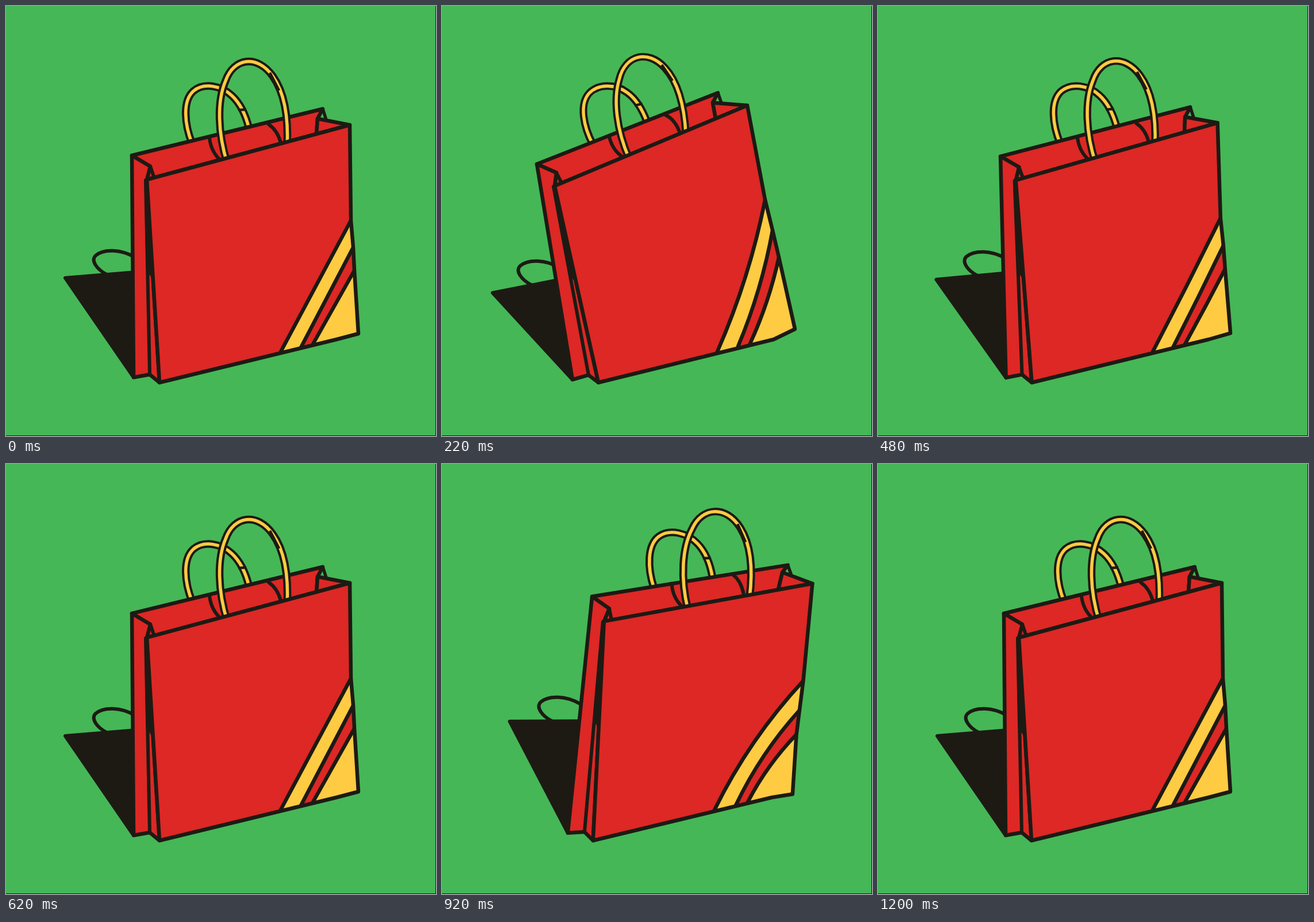
These frames come from a looping animation (748 by 748 pixels, 1.22 s). An HTML page with a canvas:

```html
<!DOCTYPE html>
<html lang="en">
<head>
<meta charset="utf-8">
<title>Swinging bag</title>
<style>
html, body { margin: 0; height: 100%; overflow: hidden; background: #45b757; }
canvas { display: block; width: 100vw; height: 100vh; }
</style>
</head>
<body>
<canvas id="stage" width="748" height="748"></canvas>
<script>
const ctx = document.getElementById('stage').getContext('2d');
const GREEN = '#45b757', RED = '#dd2825', YELLOW = '#fecb43', INK = '#1d1a14';
const LOOP = 1220, STEP = 20, HALF = 600, PEAK = 230;

// x, y at rest, then the shift for a full left lean and for a full right lean
const POINTS = {
  backL: [219, 260, -54, 15, 40, -28],
  backR: [551, 179, -71, -28, 48, -3],
  frontL: [245, 302, -49, 11, 35, -27],
  frontR: [598, 207, -67, -34, 44, 1],
  fold: [251, 279, -52, 11, 38, -26],
  edge1: [600, 373, -38, -36, 27, 4],
  edge2: [604, 420, -29, -30, 17, 8],
  edge3: [606, 460, -20, -23, 10, 10],
  baseR: [613, 570, 1, -8, -3, 4],
  bend: [575, 580, 2, 0, -1, 0],
  base3: [534, 588, 2, -1, -2, 0],
  base2: [513, 594, 2, -2, -2, 0],
  base1: [477, 603, 2, -2, -3, -1],
  baseL: [267, 655, 5, 0, -4, 0],
  seam: [250, 641, 5, 1, -2, -1],
  baseB: [222, 646, 5, 4, -3, -4],
  shadeL: [103, 473, -15, 26, 14, -24],
  shadeR: [225, 463, -20, 13, 13, -15]
};

const backHandle = new Path2D('M324 240C310 205 307 165 326 148C344 133 374 138 393 156C406 168 416 185 423 214');
const backMark = new Path2D('M404 181L418 180');
const frontHandle = new Path2D('M385 274C368 220 367 165 382 130C396 90 437 84 464 122C482 147 492 185 489 246');
const frontMark = new Path2D('M459 116L475 147');
const creases = new Path2D('M354 230Q357 255 375 270M457 206Q472 216 478 238');
const shadeHandle = new Path2D('M175 467C158 458 147 443 156 434C170 422 200 423 224 437');

const ease = p => p < .5 ? .5 * (2 * p) ** 3.5 : 1 - .5 * (2 - 2 * p) ** 3.5;
const swing = t => t < PEAK ? ease(t / PEAK) : 1 - ease(Math.min(1, (t - PEAK) / (HALF - PEAK)));
const mix = (a, b, k) => [a[0] + (b[0] - a[0]) * k, a[1] + (b[1] - a[1]) * k];

function trace(pts, closed) {
  const path = new Path2D();
  pts.forEach((p, i) => i ? path.lineTo(...p) : path.moveTo(...p));
  if (closed) path.closePath();
  return path;
}

function stroke(path, width = 6.5, color = INK) {
  ctx.lineWidth = width;
  ctx.strokeStyle = color;
  ctx.stroke(path);
}

function shape(pts, color, width) {
  const path = trace(pts, true);
  ctx.fillStyle = color;
  ctx.fill(path);
  stroke(path, width);
}

function handle(path, mark) {
  ctx.lineCap = 'butt';
  stroke(path, 13.5);
  stroke(path, 5.5, YELLOW);
  stroke(mark, 4.5);
  ctx.lineCap = 'round';
}

function draw(time) {
  const t = Math.floor(time / STEP) * STEP % LOOP;
  const left = t < HALF ? swing(t) : 0;
  const right = t < HALF ? 0 : swing(t - HALF) / .912;
  const lean = (l, r) => left * l + right * r;
  const P = {};
  for (const [name, [x, y, lx, ly, rx, ry]] of Object.entries(POINTS))
    P[name] = [x + lean(lx, rx), y + lean(ly, ry)];

  // The rim and the handles lean together as one plane
  const a = 1 + lean(-.025, .01), b = lean(-.14, .07);
  const c = lean(.098, -.07), d = 1 + lean(-.032, -.025);
  const e = 384 + lean(-60, 41) - a * 384 - c * 268;
  const f = 268 + lean(-8, -20) - b * 384 - d * 268;
  const rim = (x, y) => [a * x + c * y + e, b * x + d * y + f];
  const onRim = paint => {
    ctx.save();
    ctx.transform(a, b, c, d, e, f);
    paint();
    ctx.restore();
  };

  ctx.lineCap = ctx.lineJoin = 'round';
  ctx.fillStyle = INK;
  ctx.fillRect(0, 0, 748, 748);
  ctx.fillStyle = GREEN;
  ctx.fillRect(0, 0, 747, 747);

  ctx.save();
  ctx.translate(lean(-20, 15), lean(18, -19));
  stroke(shadeHandle, 6);
  ctx.restore();
  shape([P.shadeL, P.shadeR, mix(P.shadeR, P.baseB, .5), P.baseB], INK, 6);

  // Inside of the bag
  onRim(() => handle(backHandle, backMark));
  const tuck = rim(542, 196), tuckEnd = mix(P.frontL, P.frontR, .836);
  stroke(trace([P.backR, rim(557, 198)]), 5.5);
  shape([P.backL, P.backR, tuck, tuckEnd, P.frontL, P.fold], RED);
  shape([tuck, P.frontR, tuckEnd], RED);
  onRim(() => {
    stroke(creases, 6);
    handle(frontHandle, frontMark);
  });

  // Left side
  shape([P.backL, P.fold, P.frontL, P.baseL, P.seam, P.baseB], RED);
  stroke(trace([P.fold, mix(P.frontL, P.frontR, .036)]), 6);

  // Front with its corner stripes
  const panel = [P.frontL, P.frontR, P.edge1, P.edge2, P.edge3, P.baseR, P.bend, P.baseL];
  const outline = trace(panel, true);
  ctx.fillStyle = RED;
  ctx.fill(outline);
  ctx.save();
  ctx.clip(outline);
  const bow = lean(.055, -.07);
  [[P.base1, P.edge1, YELLOW], [P.base2, P.edge2, RED], [P.base3, P.edge3, YELLOW]].forEach(([from, to, color]) => {
    const m = mix(from, to, .5);
    const curve = new Path2D();
    curve.moveTo(...from);
    curve.quadraticCurveTo(m[0] - (to[1] - from[1]) * bow, m[1] + (to[0] - from[0]) * bow, ...to);
    const area = new Path2D(curve);
    area.lineTo(...P.baseR);
    area.lineTo(...P.bend);
    area.closePath();
    ctx.fillStyle = color;
    ctx.fill(area);
    stroke(curve);
  });
  ctx.restore();
  stroke(outline);

  // Dark gap between the front and the side
  const seamTop = [P.frontL[0] - 2, P.frontL[1] + 1];
  stroke(trace([seamTop, P.seam]), 6);
  shape([seamTop, P.frontL, mix(P.frontL, P.baseL, .48), mix(seamTop, P.seam, .46)], INK, 5);
}

draw(0);
requestAnimationFrame(start => {
  const run = now => {
    draw(Math.max(0, now - start));
    requestAnimationFrame(run);
  };
  run(start);
});
</script>
</body>
</html>
```
